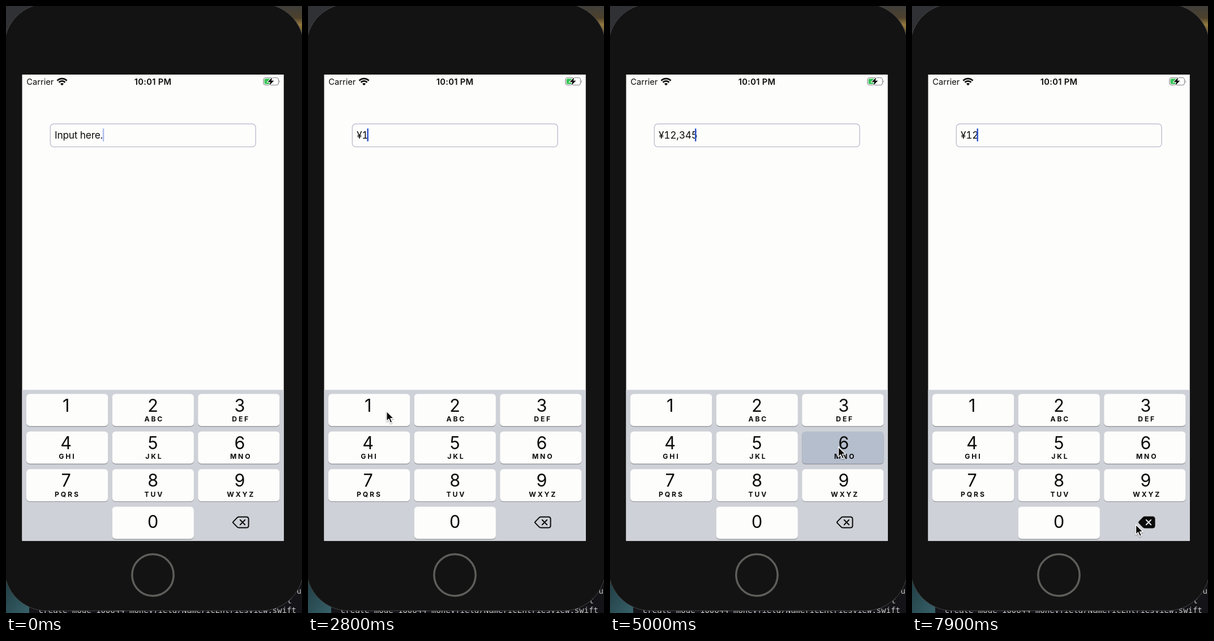
An HTML page that plays this animation: 523x1071 px, repeating every 8000 ms.

```html
<!DOCTYPE html>
<html lang="en">
<head>
<meta charset="utf-8">
<title>Currency field</title>
<style>
  html, body { margin: 0; width: 100%; height: 100%; overflow: hidden; background: #131313; }
  svg { display: block; width: 523px; height: 1071px; font-family: Inter, Roboto, sans-serif; fill: #0b0b0b; }
  .mono { font: 14px "DejaVu Sans Mono", "Liberation Mono", monospace; fill: #c9c9c9; }
  .status { font-size: 14.7px; }
  .clock { font-weight: 600; letter-spacing: .3px; text-anchor: middle; }
  .key { fill: #fdfdfc; }
  .down .key { fill: #b5becd; }
  .digit { font-size: 30.5px; text-anchor: middle; }
  .letters { font-size: 12.2px; font-weight: 700; letter-spacing: 2.8px; text-anchor: middle; }
  #value { font-size: 17.3px; letter-spacing: -.2px; font-variant-numeric: tabular-nums; }
  #del path { stroke: #0b0b0b; stroke-width: 2; stroke-linejoin: round; stroke-linecap: round; fill: none; }
  #del.down .shape { fill: #0b0b0b; }
  #del.down .cross { stroke: #e4e6ea; }
</style>
</head>
<body>
<svg viewBox="0 0 523 1071">
  <defs>
    <linearGradient id="hill" x1="0" y1="0" x2="0" y2="1">
      <stop offset="0" stop-color="#3f3e3b"/>
      <stop offset=".35" stop-color="#4d412c"/>
      <stop offset=".55" stop-color="#94793f"/>
      <stop offset="1" stop-color="#3d3322"/>
    </linearGradient>
    <linearGradient id="sea" x1="0" y1="0" x2="1" y2="1">
      <stop offset="0" stop-color="#1f3a40"/>
      <stop offset="1" stop-color="#376169"/>
    </linearGradient>
    <filter id="soft" x="-50%" y="-50%" width="200%" height="200%">
      <feDropShadow dx="0" dy="1.5" stdDeviation="1.3" flood-opacity=".35"/>
    </filter>
  </defs>

  <!-- desktop -->
  <rect width="523" height="1071" fill="#303135"/>
  <rect x="440" width="83" height="60" fill="url(#hill)"/>
  <rect y="1000" width="41" height="71" fill="url(#sea)"/>
  <rect x="41" y="1000" width="482" height="71" fill="#141418"/>
  <g class="mono" text-anchor="end">
    <text x="522" y="1037">u</text>
    <text x="505" y="1054">t</text>
    <text x="513" y="1071">create mode 100644 moneyfield/NumericEntriesView.swift</text>
  </g>

  <!-- phone -->
  <rect x="-3" y="-4" width="529" height="1071" rx="75" fill="#131313" stroke="#454547"/>
  <circle cx="259.5" cy="1004" r="36.7" fill="none" stroke="#5d5d5a" stroke-width="3.5"/>
  <rect x="28.5" y="121" width="462.3" height="822.7" fill="#fdfdfc"/>

  <!-- status bar -->
  <text class="status" x="36.3" y="139">Carrier</text>
  <text class="status clock" x="259.6" y="139">10:01 PM</text>
  <g fill="none" stroke="#0b0b0b" stroke-width="2.7">
    <path d="M90.5 131.7A12 12 0 0 1 107.5 131.7M93.5 134.7A7.8 7.8 0 0 1 104.5 134.7"/>
    <path d="M99 140.3L96 137.3A4.2 4.2 0 0 1 102 137.3Z" fill="#0b0b0b" stroke="none"/>
  </g>
  <rect x="455" y="126.5" width="26.5" height="13" rx="3.7" fill="none" stroke="#85868c" stroke-width="1.2"/>
  <path d="M483 131q2 2 0 4.5z" fill="#85868c"/>
  <rect x="456.7" y="128.2" width="11.8" height="9.6" rx="2" fill="#36c455"/>
  <path d="M470.3 126L462.5 134H467L465.4 140L473.4 131.8H468.8Z" stroke="#fdfdfc" stroke-width="2" paint-order="stroke"/>

  <!-- field -->
  <rect x="78.3" y="207.9" width="362.8" height="40.6" rx="6" fill="#fdfdfc" stroke="#c1c2d2" stroke-width="1.5"/>
  <text id="value" x="86" y="234"></text>
  <rect id="caret" y="216" width="2.5" height="23" rx="1" fill="#3257d0"/>

  <!-- keypad -->
  <rect x="28.5" y="677.3" width="462.3" height="266.4" fill="#ced1d7"/>
  <g id="pad"></g>
  <g id="del" transform="translate(.4 0)">
    <path class="shape" d="M401.4 909.6L408.2 902.6Q409.3 901.5 411 901.5H424.4Q428.2 901.5 428.2 905.3V916.7Q428.2 920.5 424.4 920.5H411Q409.3 920.5 408.2 919.4L401.4 912.4Q400 911 401.4 909.6Z"/>
    <path class="cross" d="M413.4 906.8L421.8 915.2M421.8 906.8L413.4 915.2"/>
  </g>

  <path id="mouse" d="M0 0V17.6L4 13.8L6.9 20.6L10 19.3L7.1 12.6H12.6Z" fill="#0b0b0b" stroke="#fff" stroke-width="1.3" stroke-linejoin="round" filter="url(#soft)"/>
</svg>
<script>
const $ = id => document.getElementById(id);
const LOOP = 8000, STEP = 100;

// Keys; the outer captions sit slightly outside the key centres
const labels = ['', 'ABC', 'DEF', 'GHI', 'JKL', 'MNO', 'PQRS', 'TUV', 'WXYZ'];
function keyMarkup(digit, col, row, letters) {
  const x = 36 + col * 151.6, y = 684.5 + row * 66.35, mid = 106.2 + col * 153.4;
  const base = y + (digit ? 31 : 37.6);
  return `<g id="key${digit}">
    <rect x="${x}" y="${y + 1.2}" width="144.3" height="56.7" rx="6" fill="#8b8d92"/>
    <rect class="key" x="${x}" y="${y}" width="144.3" height="56.7" rx="6"/>
    <text class="digit" x="${mid}" y="${base}">${digit}</text>
    <text class="letters" x="${mid + 2.2}" y="${y + 48.6}">${letters}</text></g>`;
}
$('pad').innerHTML = labels.map((s, i) => keyMarkup(i + 1, i % 3, Math.floor(i / 3), s)).join('')
  + keyMarkup(0, 1, 3, '');

// Presses: element, press time, release time
const presses = [
  ['del', 1400, 1600],
  ['key1', 2500, 2700], ['key2', 3100, 3300], ['key3', 3600, 3800],
  ['key4', 4100, 4300], ['key5', 4500, 4700], ['key6', 5000, 5200],
  ['key7', 5600, 5800], ['key8', 6100, 6300], ['key9', 6500, 6700],
  ['del', 7000, 8000],
];
const typed = presses.filter(p => p[0] != 'del').map(p => p[2]);
// Holding delete: one at once, then repeats
const erased = [7000, 7400, 7500, 7600, 7700, 7800, 7900];
const edits = [1400, ...typed, ...erased];

// Pointer stops: time, x, y
const stops = [
  [500, 432, 1078], [1100, 391, 921], [1900, 386.5, 919.5], [2000, 386.5, 919.5],
  [2500, 138.8, 715], [2800, 138.8, 715],
  [3100, 258, 722], [3300, 262, 722], [3600, 398, 722], [3800, 398, 722],
  [4100, 128.5, 762], [4200, 128.5, 762], [4500, 262, 774], [4700, 264, 774],
  [5000, 403.5, 778], [5200, 403.5, 778], [5600, 125.5, 841.5], [5900, 125.5, 841.5],
  [6100, 258, 845], [6300, 262, 845], [6500, 402, 845], [6700, 402, 845],
  [7000, 395.5, 915], [8000, 395.5, 915],
];
function pointer(t) {
  const i = stops.findIndex(s => s[0] > t);
  if (i < 1) return stops[0].slice(1);
  const [t0, x0, y0] = stops[i - 1], [t1, x1, y1] = stops[i];
  const u = (t - t0) / (t1 - t0), k = u * u * (3 - 2 * u);
  return [x0 + (x1 - x0) * k, y0 + (y1 - y0) * k];
}

const past = (list, t) => list.filter(e => e <= t);

function caretAlpha(t) {
  const last = past(edits, t).pop();
  const phase = last === undefined ? t + 270 : Math.max(0, t - last - 500);
  return Math.min(1, Math.max(0, .5 + .9 * Math.cos(phase / 1000 * 2 * Math.PI)));
}

function draw(t) {
  const n = past(typed, t).length - past(erased, t).length;
  const amount = n ? '¥' + Number('123456789'.slice(0, n)).toLocaleString('en-US') : '';
  const commas = amount.split(',').length - 1;
  $('value').textContent = t < 1400 ? 'Input here.' : amount;
  $('caret').setAttribute('x', t < 1400 ? 170.8 : n ? 94.2 + 10.15 * n + 5 * commas : 86.2);
  $('caret').setAttribute('opacity', caretAlpha(t));

  for (const [id] of presses) $(id).classList.remove('down');
  for (const [id, from, to] of presses)
    if (t >= from && t < to) $(id).classList.add('down');

  $('mouse').setAttribute('transform', `translate(${pointer(t)})`);
}

function tick() {
  draw(Math.floor(performance.now() % LOOP / STEP) * STEP);
  requestAnimationFrame(tick);
}
tick();
</script>
</body>
</html>
```
